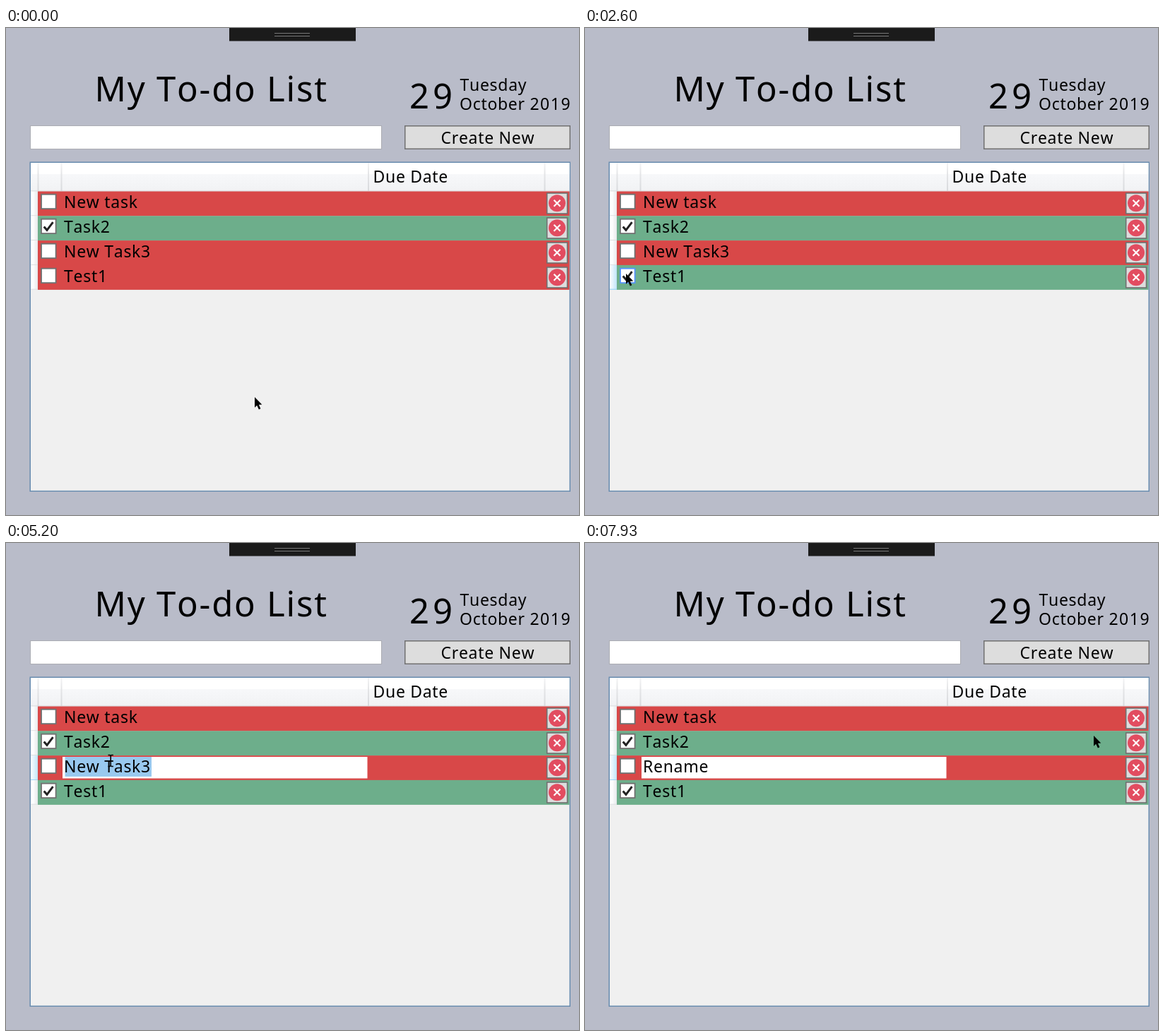
An HTML page that plays this animation: 811x690 px, repeating every 8 s.

```html
<!DOCTYPE html>
<html lang="en">
<head>
<meta charset="utf-8">
<title>To-do list</title>
<style>
html, body { margin: 0; width: 100%; height: 100%; overflow: hidden; background: #b9bcc9; }
svg { display: block; }
text { font: 23px "Noto Sans", sans-serif; font-kerning: none; letter-spacing: .7px; white-space: pre; }
.title { font-size: 49px; letter-spacing: 1.8px; }
.day { font-size: 49px; letter-spacing: 5px; }
.year { letter-spacing: 1.5px; }
</style>
</head>
<body>
<svg width="811" height="690" viewBox="0 0 811 690">
  <defs>
    <linearGradient id="head" x2="0" y2="1">
      <stop offset="0" stop-color="#fff"/><stop offset=".4" stop-color="#fff"/>
      <stop offset=".4" stop-color="#f7f8fa"/><stop offset="1" stop-color="#f1f2f4"/>
    </linearGradient>
    <linearGradient id="divider" x2="0" y2="1">
      <stop offset="0" stop-color="#f4f4f5"/><stop offset=".4" stop-color="#e4e5e7"/><stop offset="1" stop-color="#d8dadd"/>
    </linearGradient>
    <linearGradient id="side"><stop offset=".3" stop-color="#fff"/><stop offset="1" stop-color="#e6e8eb"/></linearGradient>
    <linearGradient id="sideOn"><stop offset=".2" stop-color="#f2fafe"/><stop offset="1" stop-color="#bfe4f8"/></linearGradient>
  </defs>

  <rect x="316" width="179" height="18.5" fill="#1b1b1b"/>
  <path d="M380 7.5h50M380 11.5h50" stroke="#777"/>
  <text class="title" x="125.5" y="104">My To-do List</text>
  <text class="day" x="571" y="114">29</text>
  <text x="642.5" y="88.5">Tuesday</text>
  <text x="642" y="115.5">October <tspan class="year">2019</tspan></text>
  <rect x="34.5" y="138.5" width="497" height="33" fill="#fff" stroke="#abadb3"/>
  <rect x="564.75" y="138.75" width="233.5" height="32.5" fill="#ddd" stroke="#707070" stroke-width="1.5"/>
  <text x="615.5" y="163.5">Create New</text>

  <rect x="34.25" y="190.25" width="764" height="466" fill="#f0f0f0" stroke="#688caf" stroke-width="1.5"/>
  <rect x="35" y="191" width="762.5" height="40.5" fill="url(#head)"/>
  <g fill="url(#divider)">
    <rect x="44.5" y="191" width="2" height="40"/><rect x="77.5" y="191" width="2" height="40"/>
    <rect x="512" y="191" width="2" height="40"/><rect x="761.5" y="191" width="2" height="40"/>
  </g>
  <path d="M35 231h762" stroke="#d3d4d6"/>
  <text x="519.5" y="219">Due Date</text>

  <g id="rows"></g>
  <rect id="editor" x="80" y="303" width="431.5" height="30.5" fill="#fff"/>
  <rect id="selection" x="83.5" y="303" width="122.5" height="28" fill="#99c9ef"/>
  <text id="task" x="82" y="325"></text>
  <rect id="caret" y="303" width="1" height="28"/>
  <path id="beam" d="M144.5 300.5h2.5l1.2 1 1.2-1h2.5M148.2 301v15M144.5 316.5h2.5l1.2-1 1.2 1h2.5" fill="none" stroke="#000" stroke-width="1.6"/>
  <path id="arrow" d="M0 0V14.8L3.2 11.8 5.9 17.4 8.4 16.3 5.8 10.8 10.3 10.4Z"/>
</svg>
<script>
const RED = "#d84848", GREEN = "#6dae8b";
const STEP = 1000 / 15, LOOP = 8000;
const $ = id => document.getElementById(id);
const show = (id, on) => $(id).setAttribute("visibility", on ? "visible" : "hidden");
const set = (el, attrs) => { for (const k in attrs) el.setAttribute(k, attrs[k]); };

$("rows").innerHTML = ["New task", "Task2", "", "Test1"].map((name, i) => {
  const y = 231.5 + i * 34.8, w = 35 * i;
  return `<rect class="side" x="35" y="${y}" width="10" height="34.8"/>
    <path class="edge" d="M35 ${y + 34.3}h10" stroke="#dcdee1"/>
    <rect class="bar" x="45" y="${y}" width="752.5" height="35"/>
    <g transform="translate(0 ${w})">
      <rect class="box" x="50" y="235.7" width="20.6" height="20.4" stroke-width="1.8"/>
      <path class="check" d="M53.7 246.5L58 251.3 66.5 240.2" fill="none" stroke="#212121" stroke-width="3"/>
      <text x="82" y="255">${name}</text>
      <rect x="765.7" y="234" width="28.8" height="29" fill="#ddd" stroke="#707070" stroke-width="1.6"/>
      <circle cx="780" cy="248.3" r="12" fill="#e24c60"/>
      <path d="M775.5 243.8l9 9m0-9l-9 9" stroke="#fff" stroke-width="2.2"/>
    </g>`;
}).join("");
const parts = name => [...document.querySelectorAll("." + name)];
const sides = parts("side"), edges = parts("edge"), bars = parts("bar"), boxes = parts("box"), checks = parts("check");

// Pointer path: step, x, y
const path = [
  [21, 352, 523], [22, 345, 517], [23, 311, 490], [24, 242, 450], [25, 165, 416], [27, 74, 381],
  [28, 59, 362], [30, 49, 340], [34, 59, 349], [35, 58, 348], [47, 58, 348], [49, 70, 340],
  [53, 140, 319], [55, 156, 314], [112, 230, 340], [113, 330, 372], [114, 430, 390],
  [115, 520, 383], [117, 665, 312], [118, 705, 284], [119, 720, 273]
];
function pointer(step) {
  const i = path.findIndex(p => p[0] >= step);
  if (i < 1) return path[0].slice(1);
  const a = path[i - 1], b = path[i], k = (step - a[0]) / (b[0] - a[0]);
  return [a[1] + (b[1] - a[1]) * k, a[2] + (b[2] - a[2]) * k];
}

const keyTimes = [88, 93, 97, 100, 102, 104];

function draw(step) {
  const [x, y] = pointer(step);
  const editing = step >= 60, typed = keyTimes.filter(k => step >= k).length;
  const picked = step >= 57 ? 2 : step >= 38 ? 3 : -1;
  const done = [false, true, false, step >= 39];

  bars.forEach((bar, i) => {
    const on = i === picked;
    const hover = i === 3 && x > 50 && x < 71 && y > 340 && y < 361;
    set(bar, { fill: done[i] ? GREEN : RED });
    set(sides[i], { fill: on ? "url(#sideOn)" : "url(#side)" });
    set(edges[i], { stroke: on ? "#8fd3f5" : "#dcdee1" });
    set(checks[i], { visibility: done[i] ? "visible" : "hidden" });
    set(boxes[i], { fill: hover && step === 38 ? "#d9ecff" : "#fff", stroke: hover ? "#5593ff" : "#707070" });
  });

  const task = $("task");
  task.textContent = typed ? "Rename".slice(0, typed) : "New Task3";
  show("editor", editing);
  show("selection", step >= 78 && step < 88);
  show("caret", step >= 61 && step < 69 || step === 77 || step >= 88 && step < 112);
  set($("caret"), { x: typed ? Math.round(82.4 + task.getComputedTextLength()) : 153 });
  show("beam", step >= 61 && step < 88);
  show("arrow", step < 61 || step >= 113);
  set($("arrow"), { transform: `translate(${x} ${y})` });
}

const start = performance.now();
function tick() {
  const t = (performance.now() - start) % LOOP;
  draw(Math.min(119, Math.floor((t + 5) / STEP)));
  requestAnimationFrame(tick);
}
tick();
</script>
</body>
</html>
```
